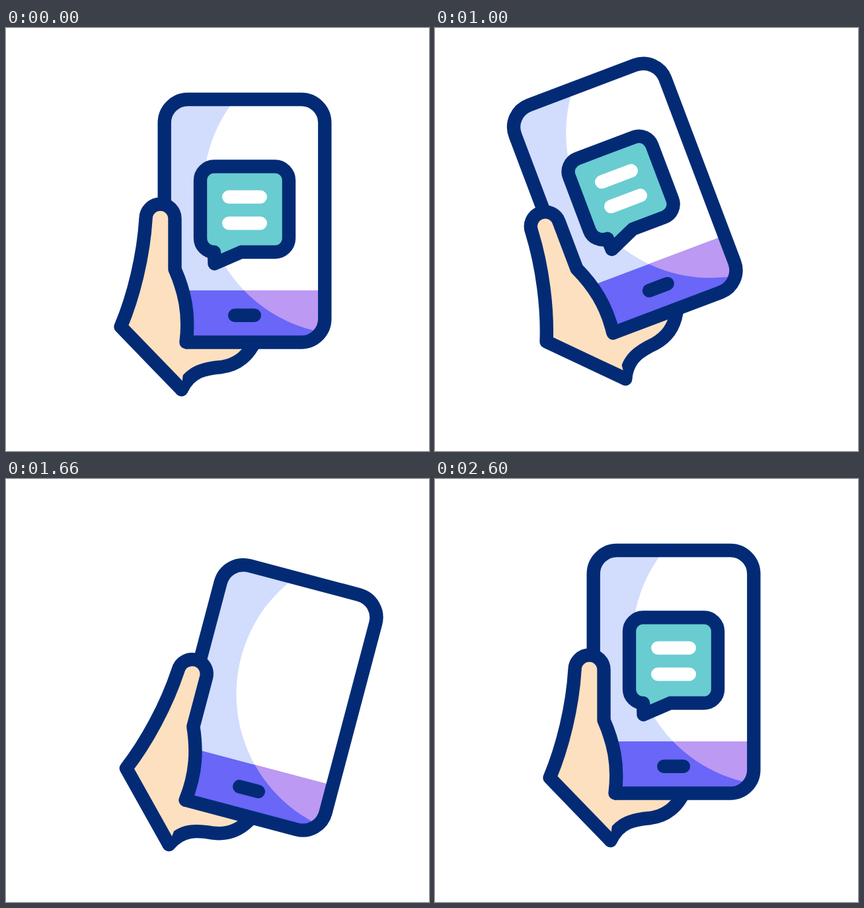
These frames come from a looping animation (640x640 px, 2820 ms). An HTML page:

```html
<!DOCTYPE html>
<html lang="en">
<head>
<meta charset="utf-8">
<title>Hand with phone message</title>
<style>
  html, body { margin: 0; width: 100%; height: 100%; overflow: hidden; background: #fff; }
  svg { display: block; width: 100%; height: 100%; }
  .ink { stroke: #032b75; stroke-width: 20.4; stroke-linecap: round; stroke-linejoin: round; }
  .white { stroke: #fff; }
  .teal { stroke: #68ccd1; }
  .line { fill: none; }
  .skin { fill: #fde0bf; }
</style>
</head>
<body>
<svg viewBox="0 0 640 640" xmlns="http://www.w3.org/2000/svg">
  <defs>
    <clipPath id="screen"><rect x="239.7" y="108" width="242.6" height="367.5" rx="35.5"/></clipPath>
    <clipPath id="band"><rect x="239" y="397" width="244" height="80"/></clipPath>
  </defs>
  <g id="scene">
    <!-- palm behind the phone -->
    <path class="skin" d="M373 481C363 498 348 510 326 513C301 515 279 519 265.5 547L230 470Z"/>
    <path class="ink line" d="M373 481C363 498 348 510 326 513C301 515 279 519 265.5 547"/>

    <g clip-path="url(#screen)">
      <rect x="239" y="107" width="244" height="369" fill="#d2dcfd"/>
      <circle cx="517.7" cy="244.8" r="219.1" fill="#fff"/>
      <g clip-path="url(#band)">
        <rect x="239" y="397" width="244" height="80" fill="#6966f8"/>
        <circle cx="517.7" cy="244.8" r="219.1" fill="#bc99f2"/>
      </g>
      <g id="message">
        <path id="bubble" class="ink" fill="#68ccd1"/>
        <path id="text" class="ink white line" d="M337.2 255.6H384.8M337.2 295.4H384.8"/>
      </g>
    </g>
    <path class="ink line" d="M346.2 434.8H375.8"/>
    <rect class="ink line" x="239.7" y="108" width="242.6" height="367.5" rx="35.5"/>

    <!-- thumb in front of the phone -->
    <path class="skin" d="M272.5 475.5C278 432 270 398 255.5 365V288.5A22 22 0 0 0 211.5 288.5C208 345 193 406 173.6 452L265.5 547Z"/>
    <path class="ink line" d="M272.5 475.5C278 432 270 398 255.5 365V288.5A22 22 0 0 0 211.5 288.5C208 345 193 406 173.6 452L265.5 547"/>
    <path id="rays" class="ink teal line"/>
  </g>
</svg>
<script>
const LOOP = 2820, STEP = 20, END = 2600;
const PIVOT = [232.5, 477];
const $ = id => document.getElementById(id);
const scene = $('scene'), message = $('message'), bubble = $('bubble'), text = $('text'), rays = $('rays');

const clamp = v => Math.min(1, Math.max(0, v));
const part = (t, a, b) => clamp((t - a) / (b - a));
const smooth = u => u * u * (3 - 2 * u);
const mix = (a, b, u) => a + (b - a) * u;

// cubic Bezier easing, solved by bisection
function bezier(x1, y1, x2, y2) {
  const at = (a, b, u) => 3 * u * (1 - u) ** 2 * a + 3 * u * u * (1 - u) * b + u ** 3;
  return x => {
    let lo = 0, hi = 1;
    for (let i = 0; i < 24; i++) {
      const m = (lo + hi) / 2;
      if (at(x1, x2, m) < x) lo = m; else hi = m;
    }
    return at(y1, y2, (lo + hi) / 2);
  };
}
const snap = bezier(.05, .4, .2, 1);

// time, angle, easing towards that angle
const SWING = [
  [200, 0], [980, -20.8, snap], [1610, 15.9, smooth],
  [1980, -5.95, smooth], [2290, 3.05, smooth], [END, 0, smooth]
];

function angle(t) {
  for (let i = 1; i < SWING.length; i++) {
    const [a, from] = SWING[i - 1], [b, to, ease] = SWING[i];
    if (t < b) return mix(from, to, ease(part(t, a, b)));
  }
  return 0;
}

// the outline grows from its lower left corner, the line weight stays
function bubblePath(s) {
  const x = v => (300 + (v - 300) * s).toFixed(2);
  const y = v => (340 + (v - 340) * s).toFixed(2);
  const p = (a, b) => x(a) + ' ' + y(b);
  const r = 21 * s;
  const arc = (a, b) => `A${r} ${r} 0 0 1 ${p(a, b)}`;
  return `M${p(315, 339)}${arc(294, 318)}L${p(294, 230.5)}${arc(315, 209.5)}` +
    `L${p(407, 209.5)}${arc(428, 230.5)}L${p(428, 318)}${arc(407, 339)}` +
    `L${p(356, 339)}L${p(315.5, 356.5)}Z`;
}

// centre and direction of each dash
const d = Math.SQRT1_2;
const RAYS = [[440, 31, 0, -1], [525, 55.6, d, -d], [553.8, 139.4, 1, 0]];

function drawRays(t) {
  const head = mix(-22, 8, part(t, 2080, 2270));
  const tail = t < 2300 ? mix(-22, -7, part(t, 2150, 2300)) : mix(-7, 8, part(t, 2300, 2420));
  const on = head - tail > .1;
  rays.setAttribute('d', on ? RAYS.map(([x, y, u, v]) =>
    `M${x + u * tail} ${y + v * tail}L${x + u * head} ${y + v * head}`).join('') : '');
}

function draw(t) {
  scene.setAttribute('transform', `rotate(${angle(t)} ${PIVOT})`);

  const back = t >= 1690;
  const out = back ? 0 : smooth(part(t, 1200, 1495));
  const size = back ? smooth(part(t, 1690, 1940)) : 1;
  message.setAttribute('transform', `translate(${14 * out} ${-270 * out})`);
  message.style.display = size > .01 && out < 1 ? '' : 'none';
  bubble.setAttribute('d', bubblePath(size));
  text.style.opacity = back ? part(t, 1810, 1916) : 1;

  drawRays(t);
}

const start = performance.now();
function tick() {
  const t = (performance.now() - start) % LOOP;
  draw(Math.floor(t / STEP) * STEP);
  requestAnimationFrame(tick);
}
tick();
</script>
</body>
</html>
```
